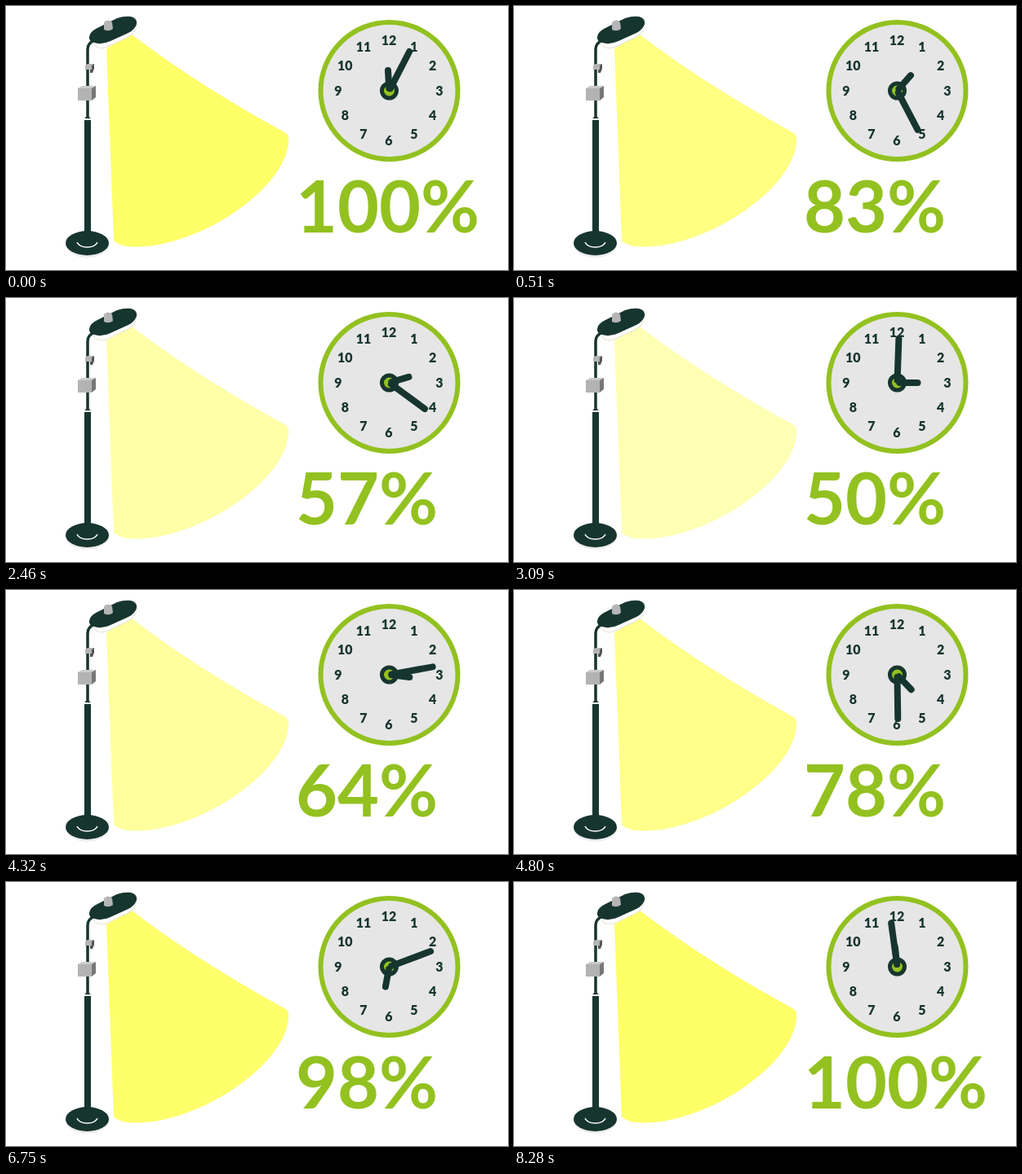
An HTML page for the animation above (8310 ms loop, 615 by 324 pixels).

```html
<!DOCTYPE html>
<html lang="en">
<head>
<meta charset="utf-8">
<style>
  html, body { margin: 0; width: 100%; height: 100%; overflow: hidden; background: #fff; }
  svg { display: block; width: 615px; height: 324px; }
  text { font-family: Lato, "Open Sans", sans-serif; }
  .dark { fill: #17352f; }
  .line { fill: none; stroke: #17352f; stroke-linecap: round; }
  #numbers { font-size: 16px; font-weight: 900; text-anchor: middle; }
  #level { font-size: 88px; font-weight: 700; fill: #93c120; }
</style>
</head>
<body>
<svg viewBox="0 0 615 324">
  <path id="beam" fill="#ffff4c" d="M123 52L154 35Q238 99 343 156Q347 159 346 168C341 225 238 295 160 295.500Q140 296 132 288Z"/>

  <!-- lamp -->
  <ellipse cx="99.500" cy="294" rx="26" ry="14.500" fill="#ececec"/>
  <path class="line" stroke-width="3.500" stroke-linecap="butt" d="M100 140V53Q100 46 108 42"/>
  <path class="line" stroke-width="8" d="M100 140V284" stroke-linecap="butt"/>
  <path fill="#fff" d="M96 138h8v2h-8z"/>
  <ellipse class="dark" cx="99.500" cy="291" rx="26.500" ry="15"/>
  <path d="M87 290Q90 296 99.500 296T112 290" fill="none" stroke="#fff" stroke-width="1.600"/>
  <path d="M107 45Q110 54 122 51L150 38Q159 33 160 22L150 26 118 43Z" fill="#fff" stroke="#e3e1cf" stroke-width="1"/>
  <path class="dark" d="M102 38Q103 31 112 27L136 15Q145 12 153 13 161 15 160 22 158 29 150 33L128 43Q117 48 108 45 101 43 102 38Z"/>
  <path fill="#b5b5b5" d="M120 20Q125 15 130 20L131 28Q126 32 120 29Z"/>
  <path fill="#b5b5b5" d="M97 73l3-2h8v5l-2 2h-9z"/>
  <path fill="#555" d="M105 73l3-2v6l-2 5h-3v-4h2z"/>
  <path fill="#b3b3b3" d="M88 101h17v15H88z"/>
  <path fill="#cbcbcb" d="M88 101l5-3h17l-5 3z"/>
  <path fill="#777" d="M105 101l5-3v14l-5 4z"/>

  <!-- clock -->
  <circle cx="469.500" cy="104" r="84" fill="#e6e6e6" stroke="#93c120" stroke-width="6"/>
  <g id="numbers" class="dark"></g>
  <g transform="translate(469.500 104)">
    <circle r="9" fill="#93c120" stroke="#17352f" stroke-width="5"/>
    <path id="hour" class="line" stroke-width="8" d="M0-3V-25"/>
    <path id="minute" class="line" stroke-width="8" d="M0-3V-54"/>
  </g>
  <text id="level" x="355" y="278"></text>
</svg>
<script>
  const LOOP = 8310, STEP = 30, FADE = 1050;
  const $ = id => document.getElementById(id);

  for (let n = 1; n <= 12; n++) {
    const a = n * Math.PI / 6;
    $("numbers").innerHTML +=
      `<text x="${469 + 62 * Math.sin(a)}" y="${109.5 - 61.5 * Math.cos(a)}">${n}</text>`;
  }

  // Ease with flat ends; a and b are the horizontal control positions.
  function ease(x, a, b) {
    let lo = 0, hi = 1;
    for (let i = 0; i < 24; i++) {
      const s = (lo + hi) / 2, r = 1 - s;
      if (3 * r * r * s * a + 3 * r * s * s * b + s * s * s < x) lo = s; else hi = s;
    }
    return lo * lo * (3 - 2 * lo);
  }
  const mix = (from, to, k) => from + (to - from) * k;

  // Hands: [from degrees, to degrees, control a, control b]
  const turns = [
    { at: 2040, len: FADE, hour: [64.5, 90, .33, .67], minute: [-2, 362, .33, .67] },
    { at: 4110, len: FADE, hour: [90, 153, .33, .65], minute: [2, 729, .33, .65] },
    { at: 6150, len: 3210, hour: [153, 424.5, .2, .73], minute: [9, 3238, .245, .639] }
  ];
  const fades = [[0, 100, 80], [2040, 80, 50], [4110, 50, 80], [6150, 80, 100]];

  function draw(t) {
    const [start, from, to] = fades.findLast(f => f[0] <= t);
    const left = 1 - Math.min(1, (t - start) / FADE);
    const level = mix(from, to, 1 - left ** 2.75);
    $("beam").style.opacity = level * .0084;
    $("level").textContent = Math.round(level) + "%";

    // The last turn runs on past the loop point.
    const u = t < 2040 ? t + LOOP : t;
    const turn = turns.findLast(s => s.at <= u);
    const x = Math.min(1, (u - turn.at) / turn.len);
    for (const hand of ["hour", "minute"]) {
      const [a0, a1, a, b] = turn[hand];
      $(hand).setAttribute("transform", `rotate(${mix(a0, a1, ease(x, a, b))})`);
    }
  }

  const begin = performance.now();
  function tick() {
    const t = (performance.now() - begin) % LOOP;
    draw(Math.floor(t / STEP) * STEP);
    requestAnimationFrame(tick);
  }
  tick();
</script>
</body>
</html>
```
